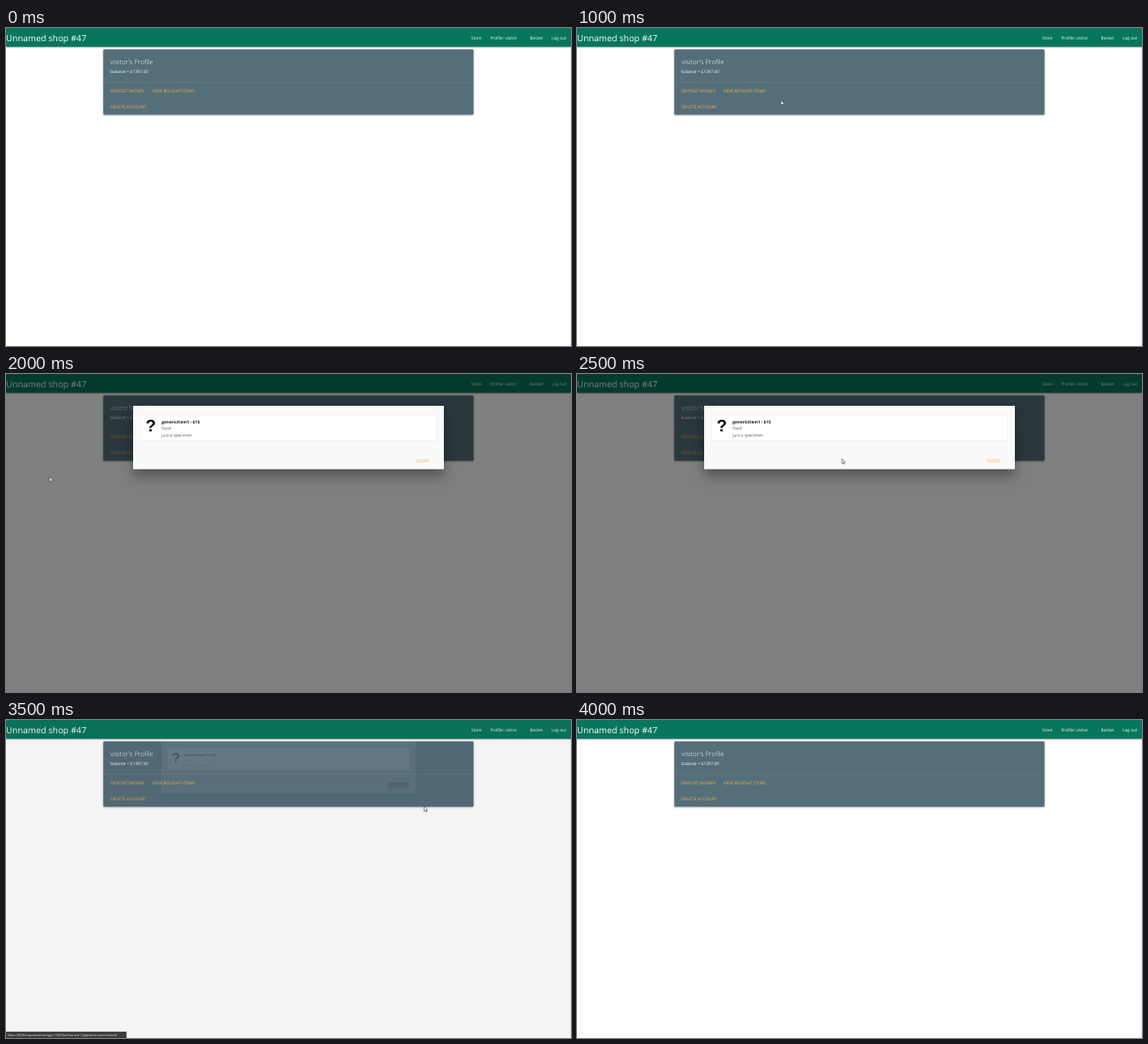
These frames come from a looping animation (640x360 px, 4.5 s). An HTML page with a canvas:

```html
<!DOCTYPE html>
<html lang="en">
<head>
<meta charset="utf-8">
<title>Shop profile</title>
<style>
html, body { margin: 0; width: 100%; height: 100%; overflow: hidden; background: #fff; }
canvas { display: block; width: 640px; height: 360px; }
</style>
</head>
<body>
<canvas id="stage" width="640" height="360"></canvas>
<script>
const ctx = document.getElementById('stage').getContext('2d');
const FONT = '"Open Sans", "Noto Sans", sans-serif';
const USER = 'visitor';
const URL_TEXT = 'https://8080-aquamarine-tiger-708l9ax8.ws-eu17.gitpod.io/user/' + USER + '#';
const STEP = 500;

// One entry per step of the loop.
const steps = [
  {},
  { cursor: ['arrow', 40, 174] },
  { cursor: ['arrow', 231, 82] },
  { cursor: ['hand', 204, 73], hover: true, status: 'faint' },
  { cursor: ['arrow', 49.3, 116.8], modal: 'open' },
  { cursor: ['arrow', 300, 96], modal: 'open' },
  { cursor: ['hand', 475, 93], modal: 'open' },
  { cursor: ['arrow', 473.7, 98], modal: 'closing', status: 'solid' },
  {}
];

function rect(x, y, w, h, color) {
  ctx.fillStyle = color;
  ctx.fillRect(x, y, w, h);
}

// Small type is laid out at triple size and scaled down to keep its spacing even.
function text(str, x, y, size, color, weight = 400, family = FONT) {
  ctx.save();
  ctx.translate(x, y);
  ctx.scale(1 / 3, 1 / 3);
  ctx.font = `${weight} ${size * 3}px ${family}`;
  ctx.textRendering = 'geometricPrecision';
  ctx.fillStyle = color;
  ctx.fillText(str, 0, 0);
  ctx.restore();
}

function shadowRect(x, y, w, h, color, dy, blur, alpha) {
  ctx.save();
  ctx.shadowColor = `rgba(0,0,0,${alpha})`;
  ctx.shadowOffsetY = dy;
  ctx.shadowBlur = blur;
  ctx.beginPath();
  ctx.roundRect(x, y, w, h, 0.7);
  ctx.fillStyle = color;
  ctx.fill();
  ctx.restore();
}

function drawPage(hover) {
  rect(0, 0, 640, 360, '#fff');
  rect(639, 22, 1, 338, '#eee');
  shadowRect(0, 0, 640, 21.3, '#08765c', 0.8, 1.5, 0.35);
  text('Unnamed shop #47', 0, 14.7, 9.87, '#fff');
  text('Store', 527, 12.7, 4.75, '#fff');
  text('Profile: ' + USER, 548.5, 12.7, 4.75, '#fff');
  text('Basket', 593.5, 12.7, 4.75, '#fff');
  text('Log out', 618, 12.7, 4.75, '#fff');

  shadowRect(110.3, 24.3, 419.2, 73.6, '#546e7a', 0.8, 2, 0.45);
  text(USER + "'s Profile", 118.3, 40.7, 7.5, '#fff', 300);
  text('balance = £1397.00', 118.3, 51, 4.75, '#fff');
  rect(110.3, 61.3, 419.2, 0.5, 'rgba(160,160,160,.3)');
  text('DEPOSIT MONEY', 118.3, 72.8, 4.88, '#ffab40');
  text('VIEW BOUGHT ITEMS', 165.7, 72.8, 4.88, hover ? '#ffd8a6' : '#ffab40');
  text('DELETE ACCOUNT', 118.3, 91.2, 4.88, '#ffab40');
}

function drawModalText() {
  text('?', 158.3, 64.8, 19, '#000', 700, '"Liberation Sans", Arial, sans-serif');
  text('genericItem1 - £15', 176.3, 56.2, 4.75, '#111', 700);
  text('food', 176.3, 63.4, 4.75, '#555');
  text('just a specimen', 176.3, 70.7, 4.75, '#555');
}

function drawOpenModal() {
  rect(0, 0, 640, 360, 'rgba(0,0,0,.5)');
  shadowRect(144, 36, 352, 71.5, '#fafafa', 8, 14, 0.35);
  rect(144, 36, 352, 71.5, '#fafafa');
  rect(152, 46, 336, 30, '#e2e2e2');
  rect(152.4, 46.4, 335.2, 29.2, '#fff');
  drawModalText();
  text('CLOSE', 464.2, 100.2, 5.2, '#ffab40');
}

function drawClosingModal() {
  rect(0, 0, 640, 360, 'rgba(0,0,0,.043)');
  ctx.save();
  ctx.translate(320, 24.3);
  ctx.scale(0.818, 0.818);
  ctx.translate(-320, -36);
  ctx.globalAlpha = 0.06;
  shadowRect(144, 36, 352, 71.5, '#fafafa', 8, 14, 0.35);
  rect(152, 46, 336, 30, '#fff');
  ctx.globalAlpha = 0.3;
  drawModalText();
  ctx.globalAlpha = 0.1;
  rect(458, 92, 29, 9, '#000');
  ctx.globalAlpha = 0.2;
  text('CLOSE', 464.2, 100.2, 5.2, '#ffab40');
  ctx.restore();
}

function drawStatus(kind) {
  const solid = kind === 'solid';
  rect(0, 352.8, solid ? 136.5 : 149, 7.2, solid ? '#3b3b3b' : '#a6a6a6');
  const label = solid ? URL_TEXT : URL_TEXT + 'bought';
  text(label, 1.7, 357.8, 3.7, solid ? '#e8e8e8' : '#dedede');
}

const cursorPaths = {
  arrow: new Path2D('M0 0V5.4L1.3 4.2L2.1 6.1L3 5.7L2.2 3.9H3.9Z'),
  hand: new Path2D('M0 0.6Q0.5 -0.3 1 0.6V2.5L3.4 3.1Q4 3.4 3.8 4.3L3.2 7H0.3L-1.5 4.4Q-1.3 3.5 0 4.4Z')
};

function drawCursor([kind, x, y]) {
  ctx.save();
  ctx.translate(x, y);
  ctx.fillStyle = '#fff';
  ctx.strokeStyle = '#222';
  ctx.lineWidth = 0.5;
  ctx.fill(cursorPaths[kind]);
  ctx.stroke(cursorPaths[kind]);
  ctx.restore();
}

function draw(now) {
  const step = steps[Math.floor(now / STEP) % steps.length];
  drawPage(step.hover);
  if (step.modal === 'open') drawOpenModal();
  if (step.modal === 'closing') drawClosingModal();
  if (step.status) drawStatus(step.status);
  if (step.cursor) drawCursor(step.cursor);
}

const start = performance.now();
function tick() {
  draw(performance.now() - start);
  requestAnimationFrame(tick);
}
tick();
</script>
</body>
</html>
```
